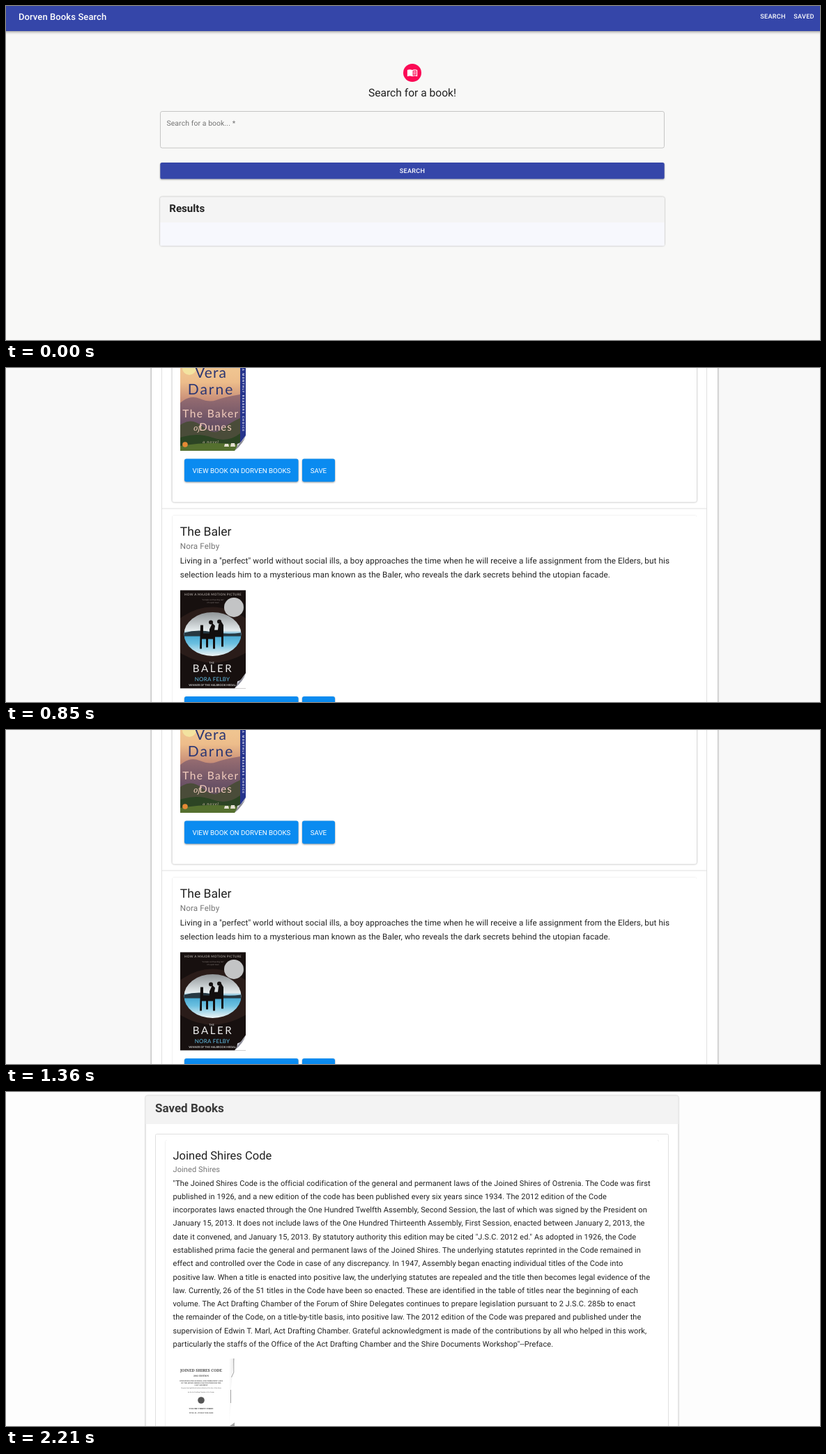
Write an HTML page that moves like this. It is 1168 px wide and 480 px high and loops after 2.55 s.

```html
<!DOCTYPE html>
<html lang="en">
<head>
<meta charset="utf-8">
<title>Book search</title>
<style>
  html, body { margin: 0; width: 100%; height: 100%; overflow: hidden; background: #f8f8f7; }
  svg { position: absolute; left: 0; top: 0; width: 1168px; height: 480px; }
  text { font-family: Roboto, sans-serif; fill: #212121; text-rendering: geometricPrecision; }
  .middle { text-anchor: middle; }
  .bold { font-weight: 700; }
  .body { letter-spacing: .00938em; }
  .muted { fill: #757575; }
  .caps { font-weight: 500; font-size: 9.1px; letter-spacing: .02857em; fill: #fff; }
  .action rect { fill: #0a8bf0; filter: drop-shadow(0 1px 1px rgba(0, 0, 0, .4)); }
  .action text { font-size: 9.74px; fill: #fff; }
  .card { fill: #fff; filter: drop-shadow(0 .6px .8px rgba(0, 0, 0, .42)); }
  .soft { filter: drop-shadow(0 0 .6px rgba(0, 0, 0, .2)); }
  .frame { fill: none; stroke: #e0e0e0; }
  .lato { font-family: Lato, sans-serif; }
  .serif { font-family: "Noto Serif", serif; fill: #444; }

  /* Each view covers the ones below it once its turn comes. */
  #results { animation: second 2550ms step-end infinite; }
  #saved { animation: third 2550ms step-end infinite; }
  @keyframes second { 0% { visibility: hidden; } 33.33333% { visibility: visible; } }
  @keyframes third { 0% { visibility: hidden; } 66.66667% { visibility: visible; } }
</style>
</head>
<body>

<svg id="search" viewBox="0 0 1168 480">
  <rect width="1168" height="480" fill="#f8f8f7"/>
  <rect x="-10" y="-10" width="1188" height="46" fill="#3546a9" style="filter:drop-shadow(0 1.5px 2px rgba(0,0,0,.45))"/>
  <text x="18" y="19.7" font-size="13" font-weight="500" letter-spacing=".0975" style="fill:#fff">Dorven Books Search</text>
  <text class="caps" x="1082.3" y="18.3">SEARCH</text>
  <text class="caps" x="1130.3" y="18.3">SAVED</text>

  <circle cx="583" cy="96" r="13" fill="#fb0a55"/>
  <g transform="translate(575.2 88.2) scale(.65)">
    <path d="M1 6C4 4 9 4 12 6C15 4 20 4 23 6V20C20 18.4 15 18.4 12 20C9 18.4 4 18.4 1 20Z" fill="#fff"/>
    <path d="M12.9 7.6C15 6.3 19 6.2 21.2 7V17.7C18.5 17 15.3 17.2 12.9 18.4Z" fill="#fb0a55"/>
    <path d="M14.2 10Q17 8.9 20 9.3M14.2 12.7Q17 11.6 20 12M14.2 15.4Q17 14.3 20 14.7" fill="none" stroke="#fff" stroke-width="1.4"/>
  </g>
  <text class="middle" x="583" y="130" font-size="15.6">Search for a book!</text>

  <rect x="221.5" y="151.5" width="723" height="52.5" rx="2.6" fill="none" stroke="#c6c6c5"/>
  <text class="body muted" x="230.5" y="172.3" font-size="10.4">Search for a book... *</text>
  <rect x="221.3" y="225" width="723.4" height="23.6" rx="2.6" fill="#3546a9" style="filter:drop-shadow(0 1px 1px rgba(0,0,0,.35))"/>
  <text class="caps middle" x="583" y="240.2">SEARCH</text>

  <rect class="card" x="221.3" y="274.5" width="723.4" height="70" rx="2.6"/>
  <path d="M221.3 344.5V311H944.7V344.5Z" fill="#f7f8fd"/>
  <path d="M221.3 311V277Q221.3 274.5 224 274.5H942Q944.7 274.5 944.7 277V311Z" fill="#f4f4f4"/>
  <text class="bold" x="234.3" y="296.4" font-size="15.1">Results</text>
</svg>

<svg id="results" viewBox="0 0 1168 480">
  <defs>
    <linearGradient id="dusk" x2="0" y2="1">
      <stop offset="0" stop-color="#f3cf98"/>
      <stop offset=".3" stop-color="#edbd8b"/>
      <stop offset=".48" stop-color="#c98f78"/>
    </linearGradient>
    <linearGradient id="hills" x2="0" y2="1">
      <stop offset="0" stop-color="#9a6f72"/>
      <stop offset=".5" stop-color="#6b5266"/>
      <stop offset="1" stop-color="#4c4d45"/>
    </linearGradient>
    <linearGradient id="lake" x2="0" y2="1">
      <stop offset="0" stop-color="#8f9497"/>
      <stop offset=".42" stop-color="#e6ecee"/>
      <stop offset=".52" stop-color="#45a7d2"/>
      <stop offset=".72" stop-color="#6cc0e0"/>
      <stop offset="1" stop-color="#eef4f5"/>
    </linearGradient>
    <linearGradient id="fold" x2="1" y2="1">
      <stop offset="0" stop-color="#fff"/>
      <stop offset=".45" stop-color="#e4e4ee"/>
      <stop offset=".5" stop-color="#8c8c98"/>
    </linearGradient>
    <g id="curl">
      <path d="M94 119V141H78Z" fill="#fff"/>
      <path d="M94 119Q91 130 78 141Q82 136 82 131Q89 129 94 119Z" fill="url(#fold)"/>
    </g>
    <g id="actions" class="action">
      <rect x="256" y="130.5" width="163.5" height="33" rx="3"/>
      <rect x="425" y="130.5" width="47" height="33" rx="3"/>
      <text x="267.5" y="150.5">VIEW BOOK ON DORVEN BOOKS</text>
      <text x="436.7" y="150.5">SAVE</text>
    </g>
  </defs>
  <rect width="1168" height="480" fill="#f8f8f8"/>
  <rect x="208.5" y="-10" width="813" height="500" fill="#fff" stroke="#c9c9c9" style="filter:drop-shadow(0 0 1px rgba(0,0,0,.3))"/>
  <path class="frame" d="M223.5 0V480M1005.5 0V480M224 202H1005"/>
  <rect class="card" x="238.5" y="-20" width="752.5" height="212.7" rx="3"/>
  <rect class="card soft" x="238.5" y="211.5" width="752.5" height="290" rx="3"/>

  <g transform="translate(250 -22)">
    <rect width="94" height="141" fill="url(#dusk)"/>
    <path d="M0 72Q14 60 28 66T52 68T86 60V141H0Z" fill="url(#hills)"/>
    <path d="M0 104Q16 92 32 106T60 110T86 94V141H0Z" fill="#4a4c39"/>
    <path d="M0 122Q24 114 46 122T86 116V141H0Z" fill="#2c4424"/>
    <path d="M0 134Q40 127 86 132V141H0Z" fill="#55702f"/>
    <path d="M64 131h5l1 4h-7zM73 130h5l1 5h-7z" fill="#e5e0d2"/>
    <rect x="86" width="8" height="141" fill="#26348c"/>
    <text class="bold" transform="translate(88.5 23) rotate(90)" font-size="4.3" letter-spacing="1.3" style="fill:#dfe0f2">A MONTHLY READERS CHOICE</text>
    <circle cx="13" cy="22" r="10" fill="#f3e3a0"/>
    <g class="lato middle">
      <text class="lato" x="44" y="36" font-size="21" letter-spacing="1" style="fill:#2b3673">Vera</text>
      <text class="lato" x="44" y="59.5" font-size="21" letter-spacing="2" style="fill:#2b3673">Darne</text>
      <text class="lato" x="44" y="93" font-size="15.5" letter-spacing="1.4" style="fill:#f3cdbd">The Baker</text>
      <text class="serif" x="24" y="112" font-size="11" font-style="italic" style="fill:#f3cdbd">of</text>
      <text class="lato" x="51" y="112" font-size="15" letter-spacing="1" style="fill:#f3cdbd">Dunes</text>
      <text class="serif" x="44" y="130" font-size="5" font-style="italic" letter-spacing="1" style="fill:#d9c3ad">a novel</text>
    </g>
    <circle cx="7" cy="132" r="3.8" fill="#e58a35"/>
    <use href="#curl"/>
  </g>
  <use href="#actions"/>

  <text x="249.8" y="240.5" font-size="17.53">The Baler</text>
  <text class="body muted" x="249.8" y="260.3" font-size="11.69">Nora Felby</text>
  <text class="body" font-size="11.69">
    <tspan x="249.8" y="280.7">Living in a "perfect" world without social ills, a boy approaches the time when he will receive a life assignment from the Elders, but his</tspan>
    <tspan x="249.8" y="301.2">selection leads him to a mysterious man known as the Baler, who reveals the dark secrets behind the utopian facade.</tspan>
  </text>

  <g transform="translate(250 319.4)">
    <rect width="94" height="141" fill="#17100f"/>
    <path d="M0 40Q45 8 94 40V90Q45 118 0 90Z" fill="#2a1c19"/>
    <ellipse cx="46.5" cy="63" rx="41" ry="31.5" fill="url(#lake)"/>
    <path d="M6 61Q24 56 46 60T87 61V66H6Z" fill="#273842"/>
    <path d="M29 50h4v12h9v-6l4-9 4 4-1 6h5l1-8 4-4 3 5v31h-3v-14h-9v17h-3v-14h-7v12h-3v-12h-6v14h-3z" fill="#120e0e"/>
    <circle cx="44" cy="46" r="3" fill="#120e0e"/>
    <circle cx="56" cy="45" r="3" fill="#120e0e"/>
    <circle cx="77" cy="24.5" r="14" fill="#c3c4c5"/>
    <g class="middle">
      <text class="lato" x="47" y="8" font-size="4.6" letter-spacing=".35" style="fill:#c8c1bc">HOW A MAJOR MOTION PICTURE</text>
      <text class="lato" x="47" y="15" font-size="2.6" style="fill:#8c8480">“A simple and haunting tale”</text>
      <text class="lato" x="47" y="18.5" font-size="2.6" style="fill:#8c8480">of a quiet town</text>
      <text class="lato" x="45" y="106" font-size="4" style="fill:#ddd">THE</text>
      <text class="lato" x="47" y="117.5" font-size="15" letter-spacing="2.6" style="fill:#eee">BALER</text>
      <text class="lato" x="46" y="130.5" font-size="8" letter-spacing=".25" style="fill:#62bfe6">NORA FELBY</text>
      <text class="lato bold" x="46" y="137.5" font-size="3.9" style="fill:#ccc">WINNER OF THE HALBROOK MEDAL</text>
    </g>
    <use href="#curl"/>
  </g>
  <use href="#actions" y="341.5"/>
</svg>

<svg id="saved" viewBox="0 0 1168 480">
  <defs>
    <linearGradient id="shade" x2="1">
      <stop offset="0" stop-color="#fff"/>
      <stop offset=".75" stop-color="#e2e2e2"/>
      <stop offset="1" stop-color="#a8a8a8"/>
    </linearGradient>
  </defs>
  <rect width="1168" height="480" fill="#fdfdfd"/>
  <rect class="card" x="200.5" y="5.5" width="764" height="490" rx="3"/>
  <path d="M200.5 46V8.5Q200.5 5.5 203.5 5.5H961.5Q964.5 5.5 964.5 8.5V46Z" fill="#f3f3f3"/>
  <text class="bold" x="214" y="29" font-size="17" style="fill:#3a3a3a">Saved Books</text>
  <rect class="frame" x="214.5" y="60.5" width="736" height="440" rx="2"/>
  <rect class="card soft" x="228.5" y="69" width="708.5" height="430" rx="3"/>

  <text x="239.5" y="97" font-size="16.5">Joined Shires Code</text>
  <text class="body muted" x="239.5" y="115.2" font-size="11">Joined Shires</text>
  <text class="body" y="115.4" font-size="11">
    <tspan x="239.5" dy="19.27">"The Joined Shires Code is the official codification of the general and permanent laws of the Joined Shires of Ostrenia. The Code was first</tspan>
    <tspan x="239.5" dy="19.27">published in 1926, and a new edition of the code has been published every six years since 1934. The 2012 edition of the Code</tspan>
    <tspan x="239.5" dy="19.27">incorporates laws enacted through the One Hundred Twelfth Assembly, Second Session, the last of which was signed by the President on</tspan>
    <tspan x="239.5" dy="19.27">January 15, 2013. It does not include laws of the One Hundred Thirteenth Assembly, First Session, enacted between January 2, 2013, the</tspan>
    <tspan x="239.5" dy="19.27">date it convened, and January 15, 2013. By statutory authority this edition may be cited "J.S.C. 2012 ed." As adopted in 1926, the Code</tspan>
    <tspan x="239.5" dy="19.27">established prima facie the general and permanent laws of the Joined Shires. The underlying statutes reprinted in the Code remained in</tspan>
    <tspan x="239.5" dy="19.27">effect and controlled over the Code in case of any discrepancy. In 1947, Assembly began enacting individual titles of the Code into</tspan>
    <tspan x="239.5" dy="19.27">positive law. When a title is enacted into positive law, the underlying statutes are repealed and the title then becomes legal evidence of the</tspan>
    <tspan x="239.5" dy="19.27">law. Currently, 26 of the 51 titles in the Code have been so enacted. These are identified in the table of titles near the beginning of each</tspan>
    <tspan x="239.5" dy="19.27">volume. The Act Drafting Chamber of the Forum of Shire Delegates continues to prepare legislation pursuant to 2 J.S.C. 285b to enact</tspan>
    <tspan x="239.5" dy="19.27">the remainder of the Code, on a title-by-title basis, into positive law. The 2012 edition of the Code was prepared and published under the</tspan>
    <tspan x="239.5" dy="19.27">supervision of Edwin T. Marl, Act Drafting Chamber. Grateful acknowledgment is made of the contributions by all who helped in this work,</tspan>
    <tspan x="239.5" dy="19.27">particularly the staffs of the Office of the Act Drafting Chamber and the Shire Documents Workshop"--Preface.</tspan>
  </text>

  <g class="middle">
    <text class="serif bold" x="280" y="402.3" font-size="5.5">JOINED SHIRES CODE</text>
    <text class="serif bold" x="280" y="409.3" font-size="3.2">2012 EDITION</text>
    <text class="serif bold" x="280" y="415.5" font-size="2.3">CONTAINING THE GENERAL AND PERMANENT LAWS</text>
    <text class="serif bold" x="280" y="418.8" font-size="2.3">OF THE JOINED SHIRES ENACTED THROUGH THE</text>
    <text class="serif bold" x="280" y="422.3" font-size="2.3">LAST ASSEMBLY</text>
    <text class="serif" x="280" y="425.5" font-size="1.9">Prepared and published under authority of the law of the shires</text>
    <text class="serif" x="280" y="431.8" font-size="1.9">by the Act Drafting Chamber of the Forum</text>
    <circle cx="280" cy="443" r="4.8" fill="#555"/>
    <text class="serif bold" x="280" y="456" font-size="2.8">VOLUME THIRTY-THREE</text>
    <text class="serif bold" x="280" y="462" font-size="2.4">TITLE 42—PUBLIC WELFARE</text>
  </g>
  <path d="M319.5 383H327.5L325 404L323 425V447L320 480H319.5Z" fill="url(#shade)" opacity=".55"/>
  <path d="M326.8 383V403L323.5 410M322.5 428V447" fill="none" stroke="#999" stroke-width=".9"/>
  <path d="M328 475V480H321Z" fill="#aaa"/>
</svg>

</body>
</html>
```
